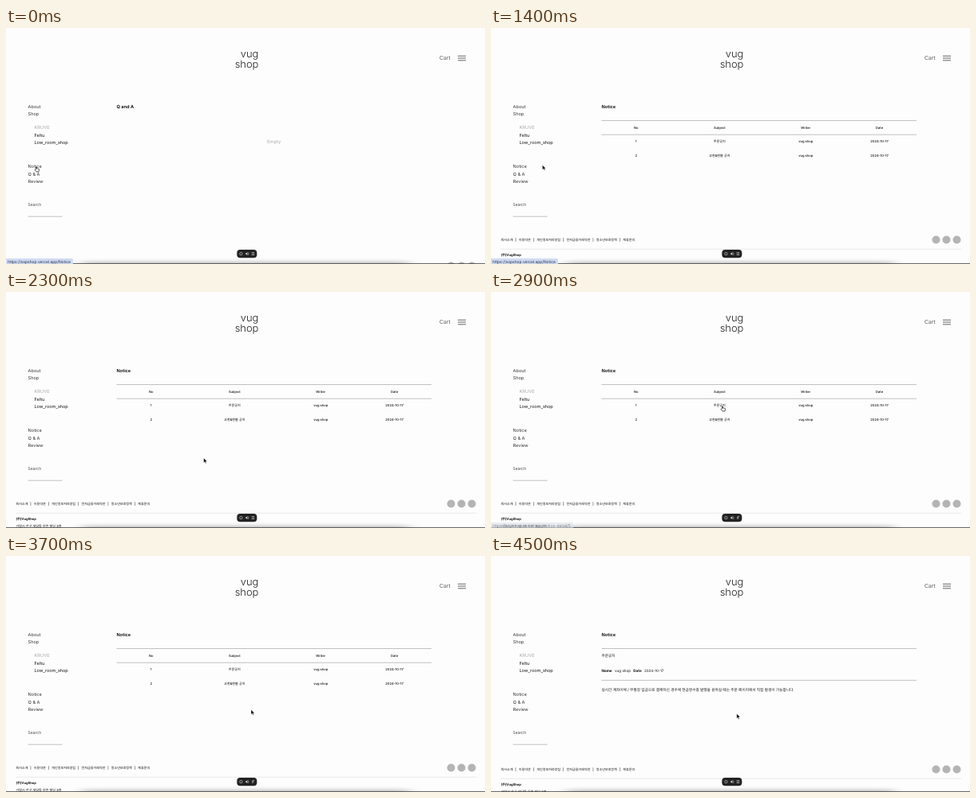
Recreate the animation shown at these times as an HTML page. Size 600x297 px, loop 4.6 s.

```html
<!DOCTYPE html>
<html lang="ko">
<head>
<meta charset="utf-8">
<title>Shop notice</title>
<style>
  html, body { margin: 0; width: 100%; height: 100%; overflow: hidden; background: #fdfdfd; }
  svg { display: block; width: 100vw; height: 100vh; }
  text {
    font-family: Inter, 'Noto Sans CJK KR', 'Noto Sans CJK JP', 'Noto Sans CJK', sans-serif;
    text-rendering: geometricPrecision;
    white-space: pre;
  }
</style>
</head>
<body>
<svg id="stage" viewBox="0 0 600 297" xmlns="http://www.w3.org/2000/svg">
  <defs>
    <filter id="soft" filterUnits="userSpaceOnUse" x="40" y="270" width="520" height="60">
      <feGaussianBlur stdDeviation="9 3.2"/>
    </filter>
  </defs>
  <g id="frame"></g>
  <g id="qna"></g>
  <g id="list"></g>
  <g id="detail"></g>
  <g id="footer"></g>
  <g id="dock">
    <rect x="95" y="296" width="410" height="14" fill="#000" opacity=".42" filter="url(#soft)"/>
    <rect x="0" y="296.2" width="600" height=".8" fill="#444"/>
    <rect x="289.3" y="279" width="25" height="10.2" rx="4" fill="#222"/>
    <g fill="none" stroke="#ddd" stroke-width=".6">
      <circle cx="294.4" cy="284.1" r="1.7"/>
      <path d="M303 282.3a2.4 2.4 0 0 1 0 3.6"/>
      <path id="grid" d="M307.6 282.6h3.6M307.6 284.1h3.6M307.6 285.6h3.6"/>
      <path id="flag" d="M309 286.2v-3.8h2M307.9 284.1h2.6"/>
    </g>
    <path d="M300 283.4h1l1.3-1.2v3.8l-1.3-1.2h-1z" fill="#ddd"/>
  </g>
  <g id="status">
    <path id="bubble"/>
  </g>
  <g id="arrow">
    <path d="M0 0v5.9l1.4-1.3 1 2.2 1-.45-1-2.1h1.9z" fill="#000" stroke="#fff" stroke-width=".4"/>
  </g>
  <g id="hand">
    <path d="M.9 3.6V.7Q1.4-.1 1.9.7V2.5L4.4 3Q5 3.2 4.9 4L4.4 6.6H1.6L-.6 4.2Q-.4 3.2.9 3.6Z"
      fill="#fff" stroke="#111" stroke-width=".7" stroke-linejoin="round"/>
  </g>
</svg>
<script>
const LOOP = 4600;
const $ = id => document.getElementById(id);

function add(parent, tag, attrs) {
  const el = document.createElementNS('http://www.w3.org/2000/svg', tag);
  for (const k in attrs) el.setAttribute(k, attrs[k]);
  return $(parent).appendChild(el);
}

// y is the middle of the capitals
function label(parent, str, x, y, size, opt = {}) {
  const el = add(parent, 'text', {
    x, y: y + size * 0.36, 'font-size': size,
    fill: opt.fill || '#111', 'font-weight': opt.weight || 400,
    'text-anchor': opt.anchor || 'start'
  });
  el.textContent = str;
  return el;
}

function rule(parent, x1, x2, y, color, width = 0.6) {
  add(parent, 'path', { d: `M${x1} ${y}H${x2}`, stroke: color, 'stroke-width': width });
}

// Header
const thin = { fill: '#222', weight: 300, anchor: 'end' };
label('frame', 'vug', 316.3, 32.5, 12.9, thin);
label('frame', 'shop', 316.3, 45.6, 12.9, thin);
label('frame', 'Cart', 543, 38, 6.9, { fill: '#333', weight: 300 });
for (const y of [35.2, 38, 40.8]) rule('frame', 566, 576, y, '#222', 0.7);

// Side menu
const MENU = [['About', 98.6], ['Shop', 108], ['Notice', 174], ['Q & A', 183.5], ['Review', 193]];
for (const [str, y] of MENU) label('frame', str, 27.6, y, 5.6, { fill: '#333' });
label('frame', 'KRUVE', 35.5, 125.3, 5.7, { fill: '#aaa' });
label('frame', 'Feltu', 35.5, 134.8, 5.5);
label('frame', 'Low_room_shop', 35.5, 144.3, 5.5);
label('frame', 'Search', 27.6, 222.3, 5, { fill: '#444' });
rule('frame', 27.6, 70.6, 237.2, '#999');

// Empty board
label('qna', 'Q and A', 138.5, 98.6, 5.7, { weight: 600, fill: '#000' });
label('qna', 'Empty', 335.6, 142.8, 5.8, { fill: '#aaa', anchor: 'middle' });

// Notice board
const COLS = [181.7, 286.3, 394.2, 486.6];
const ROWS = [
  [125.3, 'No', 'Subject', 'Writer', 'Date'],
  [143, '1', '주문공지', 'vug shop', '2024-10-17'],
  [160.4, '2', '교환&환불 공지', 'vug shop', '2024-10-17']
];
for (const id of ['list', 'detail']) {
  label(id, 'Notice', 138.5, 98.6, 5.6, { weight: 600, fill: '#000' });
  rule(id, 138.5, 533, 116.5, '#999');
}
rule('list', 138.5, 533, 134.2, '#999');
for (const [y, ...cells] of ROWS)
  cells.forEach((str, i) => label('list', str, COLS[i], y, 4.1, { weight: 500, anchor: 'middle' }));

// Notice detail
label('detail', '주문공지', 138.5, 125.5, 4.6);
label('detail', 'Name', 138.5, 144, 4.6, { weight: 700 });
label('detail', 'vug shop', 155, 144, 4.6);
label('detail', 'Date', 178.3, 144, 4.6, { weight: 700 });
label('detail', '2024-10-17', 192, 144, 4.5);
rule('detail', 138.5, 533, 156.4, '#999');
label('detail', '실시간 계좌이체 / 무통장 입금으로 결제하신 경우에 현금영수증 발행을 원하실 때는 주문 페이지에서 직접 발생이 가능합니다.',
  138.5, 168.5, 4.68);

// Footer
const LINKS = [['회사소개', 12.5], ['이용약관', 34.7], ['개인정보처리방침', 57.2],
  ['전자금융거래약관', 94.5], ['청소년보호정책', 131.7], ['제휴문의', 165.3]];
LINKS.forEach(([str, x], i) => {
  label('footer', str, x, 266.2, 4.07, { weight: 500 });
  if (i) label('footer', '|', x - 3.7, 266.2, 4.07, { weight: 500, anchor: 'middle' });
});
for (const cx of [557.5, 570.5, 583.5]) add('footer', 'circle', { cx, cy: 266.5, r: 5, fill: '#b4b4b4' });
rule('footer', 12, 589, 278.2, '#d8d8d8');
label('footer', '(주)VugShop', 12.5, 286, 4.1, { weight: 700 });
label('footer', '가람시 온구 새담동 무린 빌딩 2층', 12.5, 295, 4.1, { weight: 500 });

// Link preview
const link = label('status', '', 2, 293.9, 4.9, { fill: '#2b3140' });

// Tables of steps: [time, ...values]
const CURSOR = [
  [0, 36.6, 174.3, 1], [1400, 64.4, 172.5, 0], [1500, 148, 196, 0], [1600, 222, 221, 0],
  [2300, 247.6, 209, 0], [2400, 257, 196, 0], [2500, 269, 178, 0], [2600, 280, 160, 0],
  [2700, 287, 147, 0], [2800, 288.6, 143.4, 1], [3000, 290, 147, 0], [3100, 297, 165, 0],
  [3200, 304, 184, 0], [3300, 307, 193.5, 0], [4400, 307.4, 196, 0], [4500, 307.8, 198.6, 0]
];
const STATUS = [[0, 1], [1800, 0.45], [1900, 0], [2900, 0.6], [3000, 1], [3300, 0.5], [3400, 0]];
const PAGE = [[0, 'qna', 33], [200, 'list', 0], [3800, 'detail', 2]];
const PREVIEW = [
  [0, 'https://sopshop.vercel.app/Notice', 84, '#d0dbf4'],
  [2000, 'https://sopshop.vercel.app/notice-detail/5', 103, '#dde2e8']
];

const at = (steps, t) => steps.filter(s => s[0] <= t).pop();
const show = (id, on) => $(id).setAttribute('display', on ? 'inline' : 'none');

function draw(t) {
  const [, page, shift] = at(PAGE, t);
  for (const id of ['qna', 'list', 'detail']) show(id, id === page);
  $('footer').setAttribute('transform', `translate(0 ${shift})`);

  const [, url, w, fill] = at(PREVIEW, t);
  if (link.textContent !== url) link.textContent = url;
  $('bubble').setAttribute('d', `M0 290H${w - 2}q2 0 2 2V297H0z`);
  $('bubble').setAttribute('fill', fill);
  $('status').setAttribute('opacity', at(STATUS, t)[1]);

  const [, x, y, hand] = at(CURSOR, t);
  for (const id of ['arrow', 'hand']) $(id).setAttribute('transform', `translate(${x} ${y})`);
  show('hand', hand);
  show('arrow', !hand);

  const alt = t >= 2800 && t < 3800;
  show('flag', alt);
  show('grid', !alt);
}

const start = performance.now();
function tick() {
  draw((performance.now() - start) % LOOP);
  requestAnimationFrame(tick);
}
tick();
</script>
</body>
</html>
```
